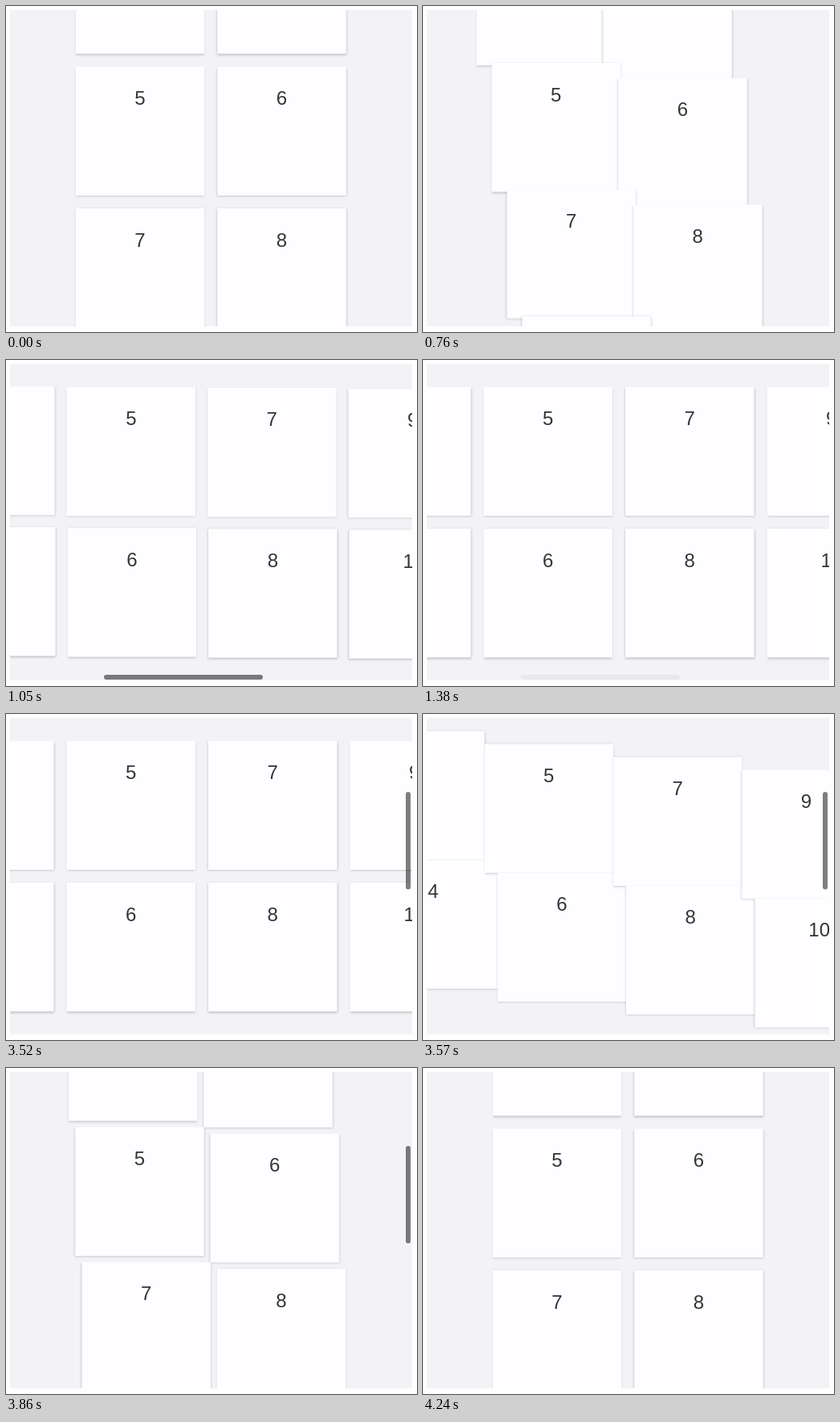
An HTML page with a canvas that plays this animation: 512x406 px, repeating every 5.94 s.

```html
<!DOCTYPE html>
<html lang="en">
<head>
<meta charset="utf-8">
<title>Grid layout switch</title>
<style>
  html, body { margin: 0; width: 100%; height: 100%; overflow: hidden; background: #fefefe; }
  canvas { display: block; }
</style>
</head>
<body>
<canvas id="stage" width="512" height="406"></canvas>
<script>
const ctx = document.getElementById('stage').getContext('2d');
const LOOP = 5940, FPS = 21;
const SIZE = 160.5, PITCH = 176.5, CARDS = 16;

// Critically damped spring, from 0 to 1
const spring = a => a <= 0 ? 0 : 1 - (1 + a) * Math.exp(-a);
const mix = (a, b, p) => a + (b - a) * p;

// 0 = vertical scrolling grid, 1 = horizontal scrolling grid
function layoutAt(k) {
  if (k < 23) return spring(1.1075 * (k - 15.5));
  if (k < 74) return 1;
  return k < 86 ? 1 - spring(0.72 * (k - 74.3)) : 0;
}

// Opacity of a scroll bar shown at one tick and faded out from another
function barAlpha(k, show, fade, rest) {
  if (k < show) return 0;
  if (k < fade) return 1;
  return [0.68, 0.34][k - fade] ?? rest;
}

function drawCard(i, p) {
  const col = i % 2, row = (i >> 1) - 2;
  const x = mix(86.75 + PITCH * col, 75.5 + PITCH * row, p);
  const y = mix(75.5 + PITCH * row, 33.5 + PITCH * col, p);
  ctx.shadowColor = 'rgba(0,0,0,.24)';
  ctx.shadowBlur = 3;
  ctx.shadowOffsetY = 1;
  ctx.fillStyle = '#fefdff';
  ctx.fillRect(x, y, SIZE, SIZE);
  ctx.shadowColor = 'transparent';
  ctx.fillStyle = '#363537';
  ctx.fillText(i + 1, x + SIZE / 2, y + 47.5);
}

function drawBar(x, y, w, h, alpha) {
  ctx.fillStyle = `rgba(0,0,0,${alpha / 2})`;
  ctx.beginPath();
  ctx.roundRect(x, y, w, h, 3);
  ctx.fill();
}

function draw(t) {
  const k = Math.floor((t + 4.5) * FPS / 1000);
  const p = layoutAt(k);
  ctx.fillStyle = '#fefefe';
  ctx.fillRect(0, 0, 512, 406);
  ctx.save();
  ctx.beginPath();
  ctx.rect(5, 5, 501, 394);
  ctx.clip();
  ctx.fillStyle = '#f3f2f6';
  ctx.fillRect(5, 5, 501, 394);
  ctx.font = '24px "Liberation Sans", Arial, sans-serif';
  ctx.textAlign = 'center';
  for (let i = 0; i < CARDS; i++) drawCard(i, p);
  if (k < 74) drawBar(122, 392, 198, 6, barAlpha(k, 17, 27, 0.09));
  else drawBar(498, 97, 6, 121.5, barAlpha(k, 74, 87, 0));
  ctx.restore();
}

const start = performance.now();
function tick() {
  draw((performance.now() - start) % LOOP);
  requestAnimationFrame(tick);
}
tick();
</script>
</body>
</html>
```
